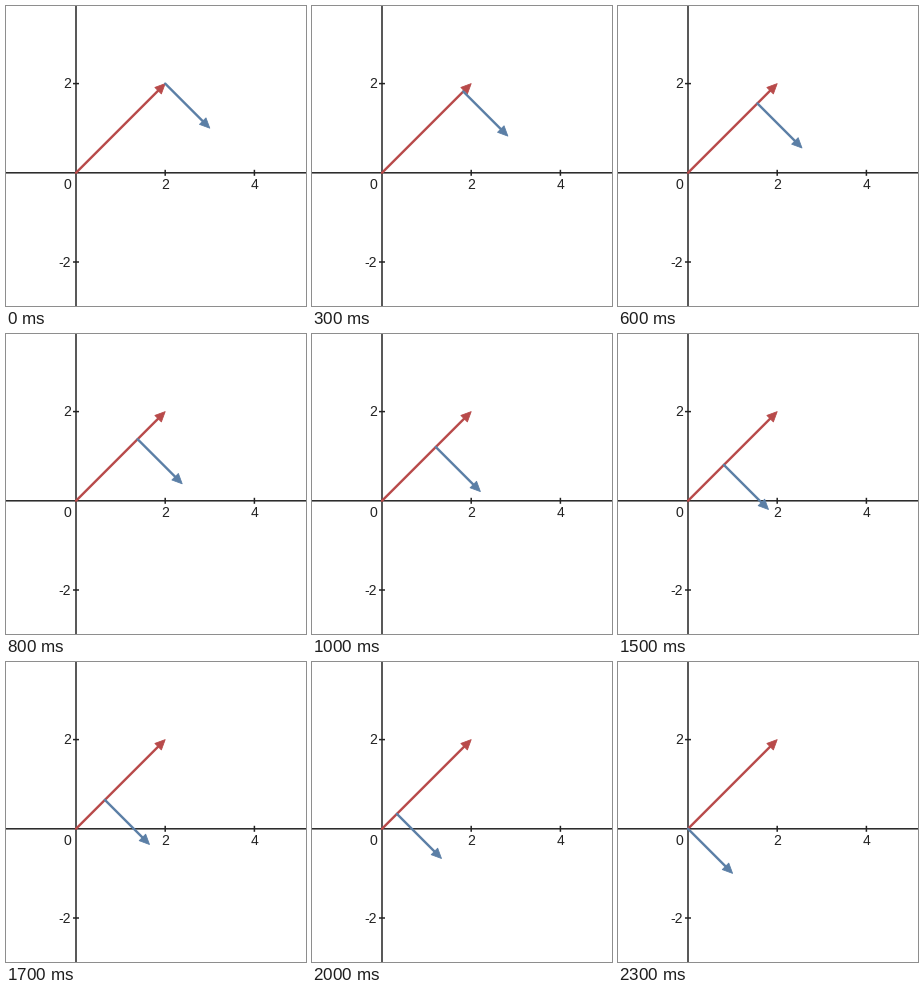
These frames come from a looping animation (300x300 px, 2.7 s). A matplotlib script:

```python
import numpy as np
import matplotlib.pyplot as plt
from matplotlib.animation import FuncAnimation
from matplotlib.patches import Polygon

SIZE, DPI = 300, 100
FRAMES, STEP_MS = 27, 100
PX = 72 / DPI                      # one pixel in points
ORIGIN = np.array([70.0, 166.8])
UNIT = 44.6
INK, RED, BLUE = "#222222", "#b84a4a", "#5b7fa6"

# Slide of the second vector, in pixels left of its start, over time
SLIDE_MS = [100, 600, 1000, 1200, 1700, 2000, 2300]
SLIDE_PX = [0, 19.8, 35.4, 42.8, 60.3, 74.3, 2 * UNIT]

fig = plt.figure(figsize=(SIZE / DPI, SIZE / DPI), dpi=DPI, facecolor="white")
ax = fig.add_axes([0, 0, 1, 1])
ax.set(xlim=(0, SIZE), ylim=(SIZE, 0))
ax.axis("off")


def to_px(x, y):
    return ORIGIN + UNIT * np.array([x, -y])


def rule(xs, ys, width=1.5):
    ax.plot(xs, ys, color=INK, lw=width * PX, snap=False,
            solid_capstyle="butt", zorder=1)


def label(x, y, text, align="center"):
    ax.text(x, y, text, color=INK, family="Liberation Sans", size=14 * PX,
            ha=align, va="baseline", zorder=1)


class Arrow:
    HEAD, HALF = 10.0, 4.6

    def __init__(self, color, z):
        self.shaft, = ax.plot([], [], color=color, lw=2.4 * PX, snap=False,
                              solid_capstyle="round", zorder=z)
        self.head = ax.add_patch(Polygon(np.zeros((3, 2)), fc=color, ec=color,
                                         lw=0.8 * PX, joinstyle="round",
                                         snap=False, zorder=z))

    def place(self, tail, tip):
        d = (tip - tail) / np.hypot(*(tip - tail))
        side = np.array([-d[1], d[0]]) * self.HALF
        base = tip - d * self.HEAD
        self.shaft.set_data(*zip(tail, base))
        self.head.set_xy([tip, base + side, base - side])


ox, oy = ORIGIN
rule([0, SIZE], [oy, oy])
rule([ox, ox], [0, SIZE])
for v in (2, 4):
    x = ox + v * UNIT
    rule([x, x], [oy - 3, oy + 3])
    label(x, 183, str(v))
for v in (2, -2):
    y = oy - v * UNIT
    rule([ox - 3, ox + 3], [y, y])
    label(65, y + 4.6, str(v), "right")
label(65, 183, "0", "right")

red = Arrow(RED, 2)
red.place(to_px(0, 0), to_px(2, 2))
blue = Arrow(BLUE, 3)


def update(i):
    s = 2 - np.interp(i * STEP_MS, SLIDE_MS, SLIDE_PX) / UNIT
    blue.place(to_px(s, s), to_px(s + 1, s - 1))
    return blue.shaft, blue.head


anim = FuncAnimation(fig, update, frames=FRAMES, interval=STEP_MS,
                     repeat=True, repeat_delay=0)
plt.show()
```
